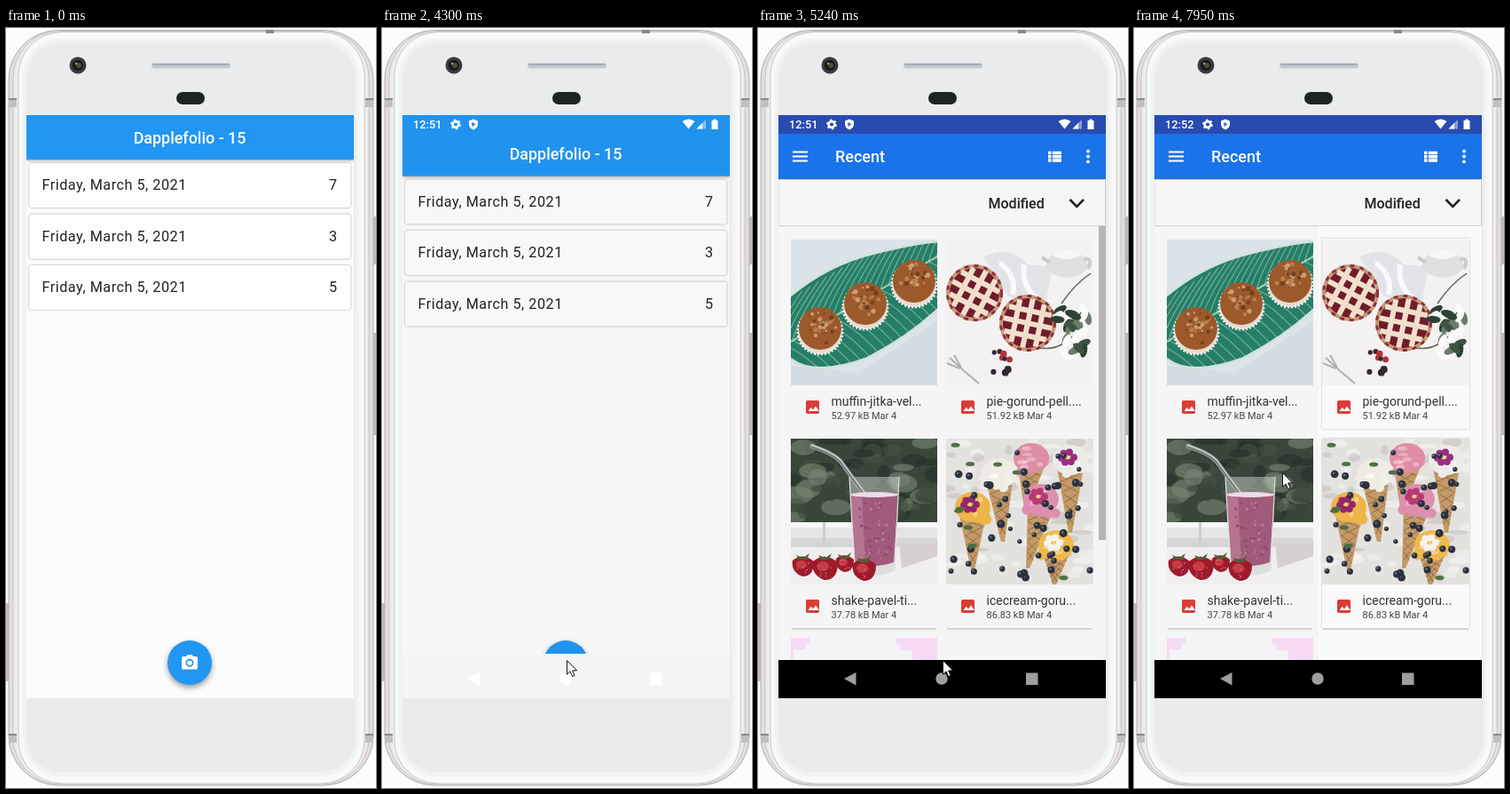
Recreate the animation shown at these times as an HTML page. Size 417x855 px, loop 8000 ms.

```html
<!DOCTYPE html>
<html lang="en">
<head>
<meta charset="utf-8">
<title>Photo picker</title>
<style>
html, body { margin: 0; width: 100%; height: 100%; overflow: hidden; background: #fcfcfc }
svg { display: block }
text { font-family: Roboto, sans-serif }
.m { font-weight: 500 }
.date { font-size: 16.2px; letter-spacing: .52px; fill: #222 }
.name { font-size: 14px; fill: #333 }
.info { font-size: 11px; fill: #444 }
</style>
</head>
<body>
<script>
let seed = 7;
const rnd = (a = 0, b = 1) => a + (b - a) * ((seed = seed * 16807 % 2147483647) / 2147483647);
const many = (n, f) => Array.from({ length: n }, (_, i) => f(i)).join('');
const pick = list => list[rnd(0, list.length) | 0];
const rect = (x, y, w, h, fill, more = '') => `<rect x="${x}" y="${y}" width="${w}" height="${h}" fill="${fill}" ${more}/>`;
const disc = (x, y, r, fill, more = '') => `<circle cx="${x}" cy="${y}" r="${r}" fill="${fill}" ${more}/>`;
const oval = (x, y, rx, ry, fill, more = '') => `<ellipse cx="${x}" cy="${y}" rx="${rx}" ry="${ry}" fill="${fill}" ${more}/>`;
const path = (d, fill, more = '') => `<path d="${d}" fill="${fill}" ${more}/>`;
const line = (d, color, w, more = '') => path(d, 'none', `stroke="${color}" stroke-width="${w}" ${more}`);
const text = (x, y, s, more) => `<text x="${x}" y="${y}" ${more}>${s}</text>`;

// ---- phone body
const mark = (x, y) => rect(x, y, 9, 10, '#c3bec1') + rect(x, y, 9, 2, '#8b878c');
const phone =
  rect(414, 212, 3, 54, '#c2bcbf') + rect(414, 343, 3, 115, '#c2bcbf') + rect(0, 647, 3, 88, '#c2bcbf') +
  rect(3, 2.5, 411, 849.5, '#e2dde0', 'rx="56" stroke="#b3acb0"') +
  rect(8, 3.5, 401, 847.5, '#eeebed', 'rx="53" stroke="#c9c3c7"') +
  rect(14, 4.5, 390, 845.5, '#f8fafa', 'rx="49" stroke="#cbc6c9"') +
  rect(19, 12, 379, 830, '#f0f2f3', 'rx="42"') +
  rect(23, 17, 371, 820, '#e9ebec', 'rx="38"') +
  mark(3, 79) + mark(405, 79) + mark(3, 794) + mark(405, 794) +
  rect(293, 2, 9, 4, '#88838a') +
  disc(81, 42, 9.5, '#3a3c3e') + disc(81, 42, 6, '#17191a') + disc(82, 42, 3, '#4a5136') + disc(79, 40, 1.2, '#9aa1a6') +
  rect(164, 39.5, 89, 6, '#c6c9cf', 'rx="3"') + rect(165, 40, 87, 2, '#a9adb4', 'rx="1"') +
  rect(192, 72, 32, 14, '#1f2425', 'rx="7"');

// ---- first screen
const entry = (y, count) =>
  rect(26, y, 362.5, 50, '#fdfdfd', 'rx="3.6" style="filter:drop-shadow(0 .8px .8px #0006)"') +
  text(40.5, y + 30, 'Friday, March 5, 2021', 'class="date"') +
  text(373.5, y + 30, count, 'class="date" text-anchor="end"');
const camera = 'M9 2 7.2 4H4C2.9 4 2 4.9 2 6V18C2 19.1 2.9 20 4 20H20C21.1 20 22 19.1 22 18V6C22 4.9 21.1 4 20 4H16.8L15 2ZM12 7A5 5 0 1 1 12 17A5 5 0 1 1 12 7Z';
const home =
  rect(23, 98, 369, 656, '#fcfcfc') +
  `<g id="list">${entry(152, 7)}${entry(209.5, 3)}${entry(267, 5)}
  ${rect(23, 60, 369, 88, '#2196f3', 'style="filter:drop-shadow(0 1.5px 1.5px #0006)"')}
  ${text(207, 129.5, 'Dapplefolio - 15', 'class="m" font-size="17.9" fill="#fff" text-anchor="middle"')}</g>` +
  disc(207, 714, 25, '#2196f3', 'id="fab"') +
  path(camera, '#fff', 'transform="translate(196.2 703.5) scale(.9)"') + disc(207, 714.2, 2.8, '#fff') +
  rect(23, 98, 369, 656, '#000', 'id="dim"') +
  rect(23, 0, 369, 656, '#f5f5f5', 'id="sheet"');

// ---- pictures
const muffin = (x, y) =>
  disc(x, y + 2, 25, '#e4dbd2', 'stroke="#f6f2ee" stroke-width="3" stroke-dasharray="2 2"') + disc(x, y - 2, 24, '#9c5a2c') +
  many(34, () => { const a = rnd(0, 6.28), r = rnd(0, 19); return disc(x + r * Math.cos(a), y - 3 + r * Math.sin(a), rnd(1, 2.8), pick(['#cda071', '#b9804c', '#74401f'])); });
const plate = 'M-4 66Q40 28 95 15T169 2V76Q130 112 85 134Q25 156 -4 132Z';
const muffins = () =>
  rect(0, 0, 165, 165, '#dce4ea') + path('M0 165V142L75 150 165 92V165Z', '#d5dce2') +
  `<clipPath id="leaf"><path d="${plate}"/></clipPath><g clip-path="url(#leaf)">` + rect(0, 0, 165, 165, '#257f66') +
  many(24, i => { const x = i * 9 - 25, y = 115 - x * .58; return line(`M${x + 38} ${y - 72}Q${x + 8} ${y - 30} ${x} ${y}Q${x + 30} ${y + 12} ${x + 62} ${y + 52}`, '#7ab09c', 1.1); }) +
  line('M0 115 165 19', '#a6cdbf', 2) + '</g>' + line(plate, '#d3e3dd', 3) +
  muffin(33, 102) + muffin(84, 74) + muffin(139, 49);

const pie = (x, y, r, turn) => {
  const lattice = [-14, 0, 14].map(d => { const h = Math.sqrt((r - 4) ** 2 - d * d); return `M${d} ${-h}V${h}M${-h} ${d}H${h}`; }).join('');
  return disc(x, y, r, '#c69a76') + disc(x, y, r - 4, '#701c2b') +
    line(lattice, '#f0dfcb', 6, `transform="translate(${x} ${y}) rotate(${turn})"`) +
    disc(x, y, r - 1.5, 'none', 'stroke="#8e2f3d" stroke-width="3" stroke-dasharray="5 6"');
};
const pies = () =>
  rect(0, 0, 165, 165, '#f3f1f1') + path('M42 20Q70 5 92 28L120 30 112 72 70 64Z', '#e3e3e7') +
  line('M60 26Q80 40 75 62M88 28Q84 50 102 66', '#f9f9fb', 6) +
  oval(136, 28, 23, 15, '#dfe1df') + oval(136, 17, 15, 5, '#f7f7f6') + line('M155 22Q166 20 160 33M117 26 108 20', '#c9cdcb', 4) +
  line('M130 72Q145 50 163 38M98 120Q128 130 150 100', '#5a6652', 1.5) +
  pie(32, 60, 32, 28) + pie(92, 94, 32, 12) +
  many(26, () => { const x = rnd(124, 160), y = rnd(76, 136); return oval(x, y, 8, 4, pick(['#2c4033', '#3d5343', '#6a7d6b', '#fafafa']), `transform="rotate(${rnd(0, 180)} ${x} ${y})"`); }) +
  many(9, i => disc(rnd(50, 84), rnd(122, 154), rnd(2.5, 4.5), i % 3 ? '#342731' : '#b32f3b')) +
  line('M17 145 37 162M4 133 17 145M1 139 15 145M9 130 17 144', '#b0aeb2', 2);

const berry = (x, y, r) =>
  path(`M${x - r} ${y - r * .5}Q${x} ${y - r * 1.3} ${x + r} ${y - r * .4}Q${x + r} ${y + r} ${x - 1} ${y + r}Q${x - r * 1.2} ${y + r * .6} ${x - r} ${y - r * .5}Z`, '#9c1c2c') +
  oval(x - r * .2, y - r * .1, r * .5, r * .4, '#c43a45') +
  many(9, () => disc(x + rnd(-.6, .6) * r, y + rnd(-.4, .7) * r, .7, '#dd7079')) +
  path(`M${x - 8} ${y - r}L${x} ${y - r + 3} ${x + 7} ${y - r - 2} ${x + 4} ${y - r + 5} ${x - 5} ${y - r + 5}Z`, '#4a6339');
const shake = () =>
  rect(0, 0, 165, 165, '#3a463a') +
  many(70, () => oval(rnd(0, 165), rnd(0, 90), rnd(5, 18), rnd(4, 11), pick(['#252f29', '#465341', '#7a8774', '#374638']), 'opacity=".6"')) +
  rect(0, 94, 165, 71, '#e6e4e6') + rect(0, 94, 165, 6, '#f7f7f8') + rect(0, 112, 165, 10, '#d6d4d7') +
  rect(0, 122, 165, 43, '#f0eeef') + path('M122 118H165V132L125 146Z', '#d6cfd0') + rect(36, 94, 3, 26, '#cbcacd') +
  path('M66 43H122L117 148Q94 158 72 148Z', '#c9d0ca', 'opacity=".5"') +
  line('M22 8Q50 17 57 27L84 64', '#c4c7c4', 4.5) + line('M22 9Q50 18 57 28L84 65', '#727873', 2) +
  path('M67 63H121L116 139Q94 147 73 139Z', '#a05a7a') + path('M67 63H80L84 141 73 139Z', '#b5738f') +
  many(45, () => disc(rnd(76, 114), rnd(70, 136), rnd(.8, 1.8), pick(['#b67c98', '#8c4a6a']))) +
  oval(94, 63, 27, 3, '#f0dbe4') + line('M66 43 72 148Q94 158 117 148L122 43', '#dfe3e1', 1.2) +
  berry(14, 143, 12) + berry(61, 140, 10) + berry(39, 145, 14) + berry(83, 147, 13);

const cone = (x, y, tx, ty, color, petal) => {
  const mid = k => [x + (tx - x) * k, y + (ty - y) * k];
  return path(`M${x - 15} ${y + 6}L${x + 15} ${y + 6} ${tx + 2} ${ty} ${tx - 2} ${ty}Z`, '#c39a68') +
    many(5, i => { const [a, b] = mid(.2 + i * .15), w = 12 - i * 2.2; return line(`M${a - w} ${b - 4}L${a + w} ${b + 6}M${a + w} ${b - 4}L${a - w} ${b + 6}`, '#946b40', 1); }) +
    oval(x, y - 3, 20, 17, color) + many(9, () => disc(x + rnd(-17, 17), y + rnd(-4, 13), rnd(3, 6), color)) +
    many(7, () => oval(x + rnd(-12, 12), y + rnd(-14, 8), rnd(2, 6), rnd(1, 3), '#fff', 'opacity=".35"')) +
    (petal ? many(6, i => disc(x - 3 + 7 * Math.cos(i), y - 6 + 6 * Math.sin(i), 4, petal)) + disc(x - 3, y - 6, 2, '#f3d76a') : '');
};
const cones = () =>
  rect(0, 0, 166, 165, '#e4e2df') + many(70, () => oval(rnd(0, 166), rnd(0, 165), rnd(4, 13), rnd(2, 6), pick(['#f4f3f1', '#f0efec', '#c9c6c2']), 'opacity=".7"')) +
  cone(96, 25, 90, 78, '#df8ea4') + cone(60, 42, 64, 116, '#efece4') + cone(140, 27, 140, 106, '#ecebe6', '#9c2d80') +
  cone(30, 80, 30, 148, '#efb549', '#93286a') + cone(107, 71, 92, 146, '#dd8fae', '#b93a75') + cone(124, 123, 122, 164, '#f0b94b', '#f5f3ef') +
  many(52, () => { const x = rnd(2, 164), y = rnd(8, 160), r = rnd(2.6, 4.6); return disc(x, y, r, '#2a313c') + disc(x - 1, y - 1, 1.3, '#667087'); }) +
  many(9, () => oval(rnd(2, 164), rnd(5, 160), 5, 2.5, '#4f7044'));

// ---- picker screen
const tile = (x, y, pic, name, info) =>
  `<svg x="${x}" y="${y}" width="${x > 99 ? 166 : 165}" height="164">${pic()}</svg>` +
  rect(x + 17, y + 181, 15, 15, '#d93d35', 'rx="1.8"') + path(`M${x + 19.5} ${y + 193}l3.2-4.3 2.3 2.8 3-4 4 5.5Z`, '#fff') +
  text(x + 45.5, y + 187, name, 'class="name"') + text(x + 45.5, y + 202, info, 'class="info"');
const card = (x, y) => rect(x, y, 166, 214, '#fafafa', 'style="filter:drop-shadow(.4px .8px .8px #0004)"');
const picker =
  rect(23, 98, 369, 656, '#f5f5f5') + rect(23, 98, 369, 21, '', 'id="top"') + rect(23, 119, 369, 51, '#1a73e8') +
  line('M39 139.5H56M39 144.5H56M39 149.5H56', '#fff', 1.8) + text(87, 151, 'Recent', 'class="m" font-size="18" fill="#fff"') +
  line('M327 140.5H330.5M327 144.7H330.5M327 149H330.5M331.8 140.5H342M331.8 144.7H342M331.8 149H342', '#fff', 3.4) +
  [138.7, 144.5, 150.3].map(y => disc(372, y, 1.9, '#fff')).join('') +
  rect(23, 170.5, 368.5, 52, '#f6f6f6', 'stroke="#cfcfcf"') +
  text(259.5, 202.5, 'Modified', 'class="m" font-size="16" fill="#222"') + line('M351.5 193 359.3 200.8 367 193', '#222', 2.6) +
  `<g id="fresh">${rect(208, 223, 184, 488, '#fafafa')}${card(212, 237)}${card(212, 462)}</g>` +
  line('M38 676H201M213 676H377', '#cbcbcb', 1.5) +
  tile(37, 238, muffins, 'muffin-jitka-vel...', '52.97 kB Mar 4') + tile(212, 238, pies, 'pie-gorund-pell....', '51.92 kB Mar 4') +
  tile(37, 462, shake, 'shake-pavel-ti...', '37.78 kB Mar 4') + tile(212, 462, cones, 'icecream-goru...', '86.83 kB Mar 4') +
  rect(37, 686, 165, 25, '#f4f3f5') + path('M37 686H58V692H54V699H40V711H37ZM156 686H202V711H174V700H160V694H156Z', '#f6daf3') +
  rect(384, 223, 8, 353, '#b5b5b5', 'id="scroll"');

const gear = disc(83, 108.5, 3.4, 'none', 'stroke="#fff" stroke-width="2.6"') + disc(83, 108.5, 4.9, 'none', 'stroke="#fff" stroke-width="2" stroke-dasharray="2.3 2.83"');
const status = text(35, 113, '12:51', 'id="clock" class="m" font-size="12.8" fill="#fff"') + gear +
  path('M103 102.5L108 104.5V108Q108 112.5 103 114.5Q98 112.5 98 108V104.5Z', '#fff') + path('M101.3 105.8 105.6 108.4 101.3 111Z', '#3a72c8') +
  path('M338.5 105Q345.5 100 352.5 105L345.5 113.5Z', '#fff') + path('M354.5 113.5H365V103Z', '#fff', 'opacity=".45"') + path('M354.5 113.5H361V107Z', '#fff') +
  path('M371.5 104H373.5V102.5H376.5V104H378.5V114H371.5Z', '#fff');
const nav = rect(23, 711, 369, 43, '', 'id="navBg"') +
  `<g id="keys">${path('M97 732 110.5 725V739.5Z', '')}${disc(207, 732, 6.7, '')}${rect(302, 725.5, 13.5, 13.5, '')}</g>`.replace(/fill=""/g, '');

document.body.innerHTML = `<svg width="417" height="855" viewBox="0 0 417 855">${phone}
<clipPath id="screen">${rect(23, 98, 369, 656, '#000')}</clipPath>
<g clip-path="url(#screen)"><g id="home">${home}</g><g id="picker">${picker}</g><g id="nav">${nav}</g><g id="status">${status}</g></g>
${path('M.5 .5V16.2L4.1 12.8 6.7 18.6 9.1 17.5 6.6 11.9H11.6Z', '#fff', 'id="pointer" stroke="#111"')}</svg>`;

// ---- timeline: each entry holds until the next one
const moves = [
  [710, 384, 682], [830, 379, 683], [950, 376, 683], [1090, 366, 683], [1210, 350, 684], [1330, 334, 685], [1450, 319, 686],
  [1570, 308, 687], [1720, 272, 693], [1850, 237, 704], [2000, 211, 710], [2150, 208, 711],
  [6240, 212, 691], [6360, 220, 662], [6480, 228, 630], [6630, 231, 619], [6750, 232, 614], [6900, 232, 612], [7020, 232, 610],
  [7170, 241, 598], [7320, 248, 570], [7440, 240, 526], [7560, 224, 486], [7710, 202, 450], [7830, 182, 472], [7950, 167, 500]];
const sheets = [[0, 754, 0], [4300, 704, .02], [4420, 590, .05], [4540, 410, .07], [4690, 259, .085]];
const bars = [[0, 'none', '#fff', 'none'], [4540, '#f3f3f3', '#fff', 'none'], [4970, '#323232', '#bababa', '#4d70bf'],
  [5120, '#161616', '#a8a8a8', '#385bb6'], [5240, '#000', '#9e9e9e', '#284baf']];
const scrolls = [[0, 0], [5120, 1], [6240, .8], [6360, .4], [6480, 0]];
const at = (list, t) => list.findLast(k => k[0] <= t);
const get = id => document.getElementById(id);
const set = (id, name, value) => get(id).setAttribute(name, value);
const show = (id, on) => set(id, 'visibility', on ? 'visible' : 'hidden');

function draw(t) {
  const tip = at(moves, t), [, top, dim] = at(sheets, t), [, navBg, keys, bar] = at(bars, t);
  show('pointer', tip);
  if (tip) set('pointer', 'transform', `translate(${tip[1]} ${tip[2]})`);
  set('list', 'transform', `translate(0 ${t < 4300 ? 0 : 18.5})`);
  get('fab').style.filter = t >= 3490 && t < 3740 ? 'drop-shadow(0 6px 5px #0006)' : 'drop-shadow(0 3px 3px #0006)';
  set('dim', 'opacity', dim);
  set('sheet', 'y', top);
  show('status', t >= 4300);
  show('nav', t >= 4300);
  show('picker', t >= 4970);
  show('fresh', t >= 6240);
  set('navBg', 'fill', navBg);
  set('keys', 'fill', keys);
  set('top', 'fill', bar);
  set('scroll', 'opacity', at(scrolls, t)[1]);
  get('clock').textContent = t < 6630 ? '12:51' : '12:52';
}
const start = performance.now();
function tick() {
  draw((performance.now() - start) % 8000);
  requestAnimationFrame(tick);
}
tick();
</script>
</body>
</html>
```
